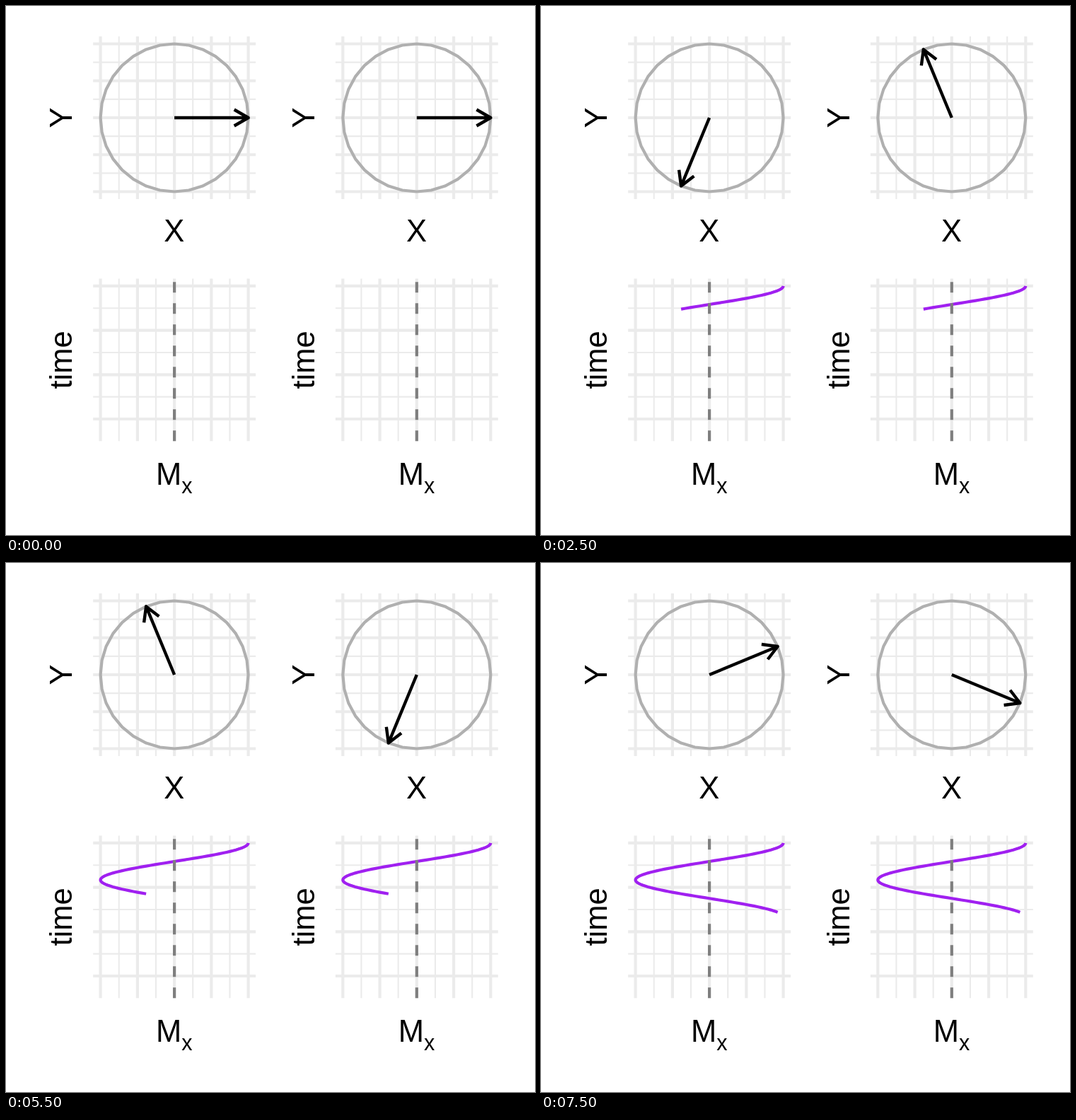
Write an HTML page that moves like this. It is 748 px wide and 748 px high and loops after 8 s.

```html
<!DOCTYPE html>
<html lang="en">
<head>
<meta charset="utf-8">
<title>Counter-rotating vectors</title>
<style>
  html, body { margin: 0; width: 100%; height: 100%; overflow: hidden; background: #fff; }
  svg { display: block; width: 100vw; height: 100vh; }
  path { fill: none; stroke-linejoin: round; }
  text { font-family: "Liberation Sans", Arial, sans-serif; font-size: 43.5px; text-anchor: middle; }
  .major { stroke: #ebebeb; stroke-width: 4.2; }
  .minor { stroke: #ebebeb; stroke-width: 2.1; }
  .ring { stroke: #b0b0b0; stroke-width: 4.2; }
  .arrow { stroke: #000; stroke-width: 4.4; }
  .trace { stroke: #a020f0; stroke-width: 4.2; }
  .axis { stroke: #7f7f7f; stroke-width: 4.2; stroke-dasharray: 15 15; }
</style>
</head>
<body>
<svg id="stage" viewBox="0 0 748 748"></svg>
<script>
const NS = "http://www.w3.org/2000/svg";
const R = 104.5;              // unit length in pixels
const HALF = R * 1.1;         // half a panel
const TOP = 158, LOW = 500.4; // panel centres
const START = LOW - R;        // where time is zero
const STEP_MS = 500, STEPS = 16;
const TURN = Math.PI / 8;     // angle per step
const DROP = 2 * R / 32;      // trace height per step
const HEAD = 23;

const stage = document.getElementById("stage");

function add(parent, tag, attrs, label) {
  const el = document.createElementNS(NS, tag);
  for (const key in attrs) el.setAttribute(key, attrs[key]);
  if (label) el.textContent = label;
  return parent.appendChild(el);
}

const line = points =>
  "M" + points.map(([x, y]) => x.toFixed(2) + " " + y.toFixed(2)).join("L");

const sample = (n, f) => Array.from({ length: n + 1 }, (_, i) => f(i));

// Grid lines alternate between major and minor, starting with major.
function grid(g, cx, cy, rowGap) {
  for (const [name, odd] of [["minor", 1], ["major", 0]]) {
    let d = "";
    for (let i = odd; i <= 8; i += 2) {
      const x = cx - R + i * R / 4, y = cy - R + i * rowGap;
      if (y < cy + R + 1) d += line([[cx - HALF, y], [cx + HALF, y]]);
      d += line([[x, cy - HALF], [x, cy + HALF]]);
    }
    add(g, "path", { class: name, d });
  }
}

function sideLabel(g, x, y, label) {
  add(g, "text", { transform: `translate(${x} ${y}) rotate(-90)` }, label);
}

function column(cx, spin) {
  const g = add(stage, "g", {});
  grid(g, cx, TOP, R / 4);
  grid(g, cx, LOW, R * 0.3);

  const ring = sample(31, i => {
    const a = i * Math.PI / 16;
    return [cx + R * Math.cos(a), TOP + R * Math.sin(a)];
  });
  add(g, "path", { class: "ring", d: line(ring) + "Z" });
  const arrow = add(g, "path", { class: "arrow" });
  const trace = add(g, "path", { class: "trace" });
  add(g, "path", { class: "axis", d: line([[cx, LOW + HALF], [cx, LOW - HALF]]) });

  add(g, "text", { x: cx - 0.4, y: 333 }, "X");
  sideLabel(g, cx - 145, TOP, "Y");
  sideLabel(g, cx - 145, LOW, "time");
  const mx = add(g, "text", { x: cx - 0.4, y: 677 }, "M");
  add(mx, "tspan", { dy: 12, "font-size": 30.5, style: "font-size:30.5px" }, "x");

  return step => {
    const a = spin * step * TURN;
    const tip = [cx + R * Math.cos(a), TOP + R * Math.sin(a)];
    const barb = side => {
      const b = a + side * Math.PI / 6;
      return [tip[0] - HEAD * Math.cos(b), tip[1] - HEAD * Math.sin(b)];
    };
    arrow.setAttribute("d", line([[cx, TOP], tip]) + line([barb(-1), tip, barb(1)]));

    const curve = sample(step * 6, i => {
      const s = i / 6;
      return [cx + R * Math.cos(s * TURN), START + s * DROP];
    });
    trace.setAttribute("d", step ? line(curve) : "");
  };
}

const columns = [column(238.1, 1), column(580.8, -1)];
let shown = -1;

function draw(now) {
  const step = Math.floor(now / STEP_MS) % STEPS;
  if (step !== shown) {
    columns.forEach(update => update(step));
    shown = step;
  }
}

let origin = null;
function tick(now) {
  if (origin === null) origin = now;
  draw(Math.max(0, now - origin));
  requestAnimationFrame(tick);
}
draw(0);
requestAnimationFrame(tick);
</script>
</body>
</html>
```
